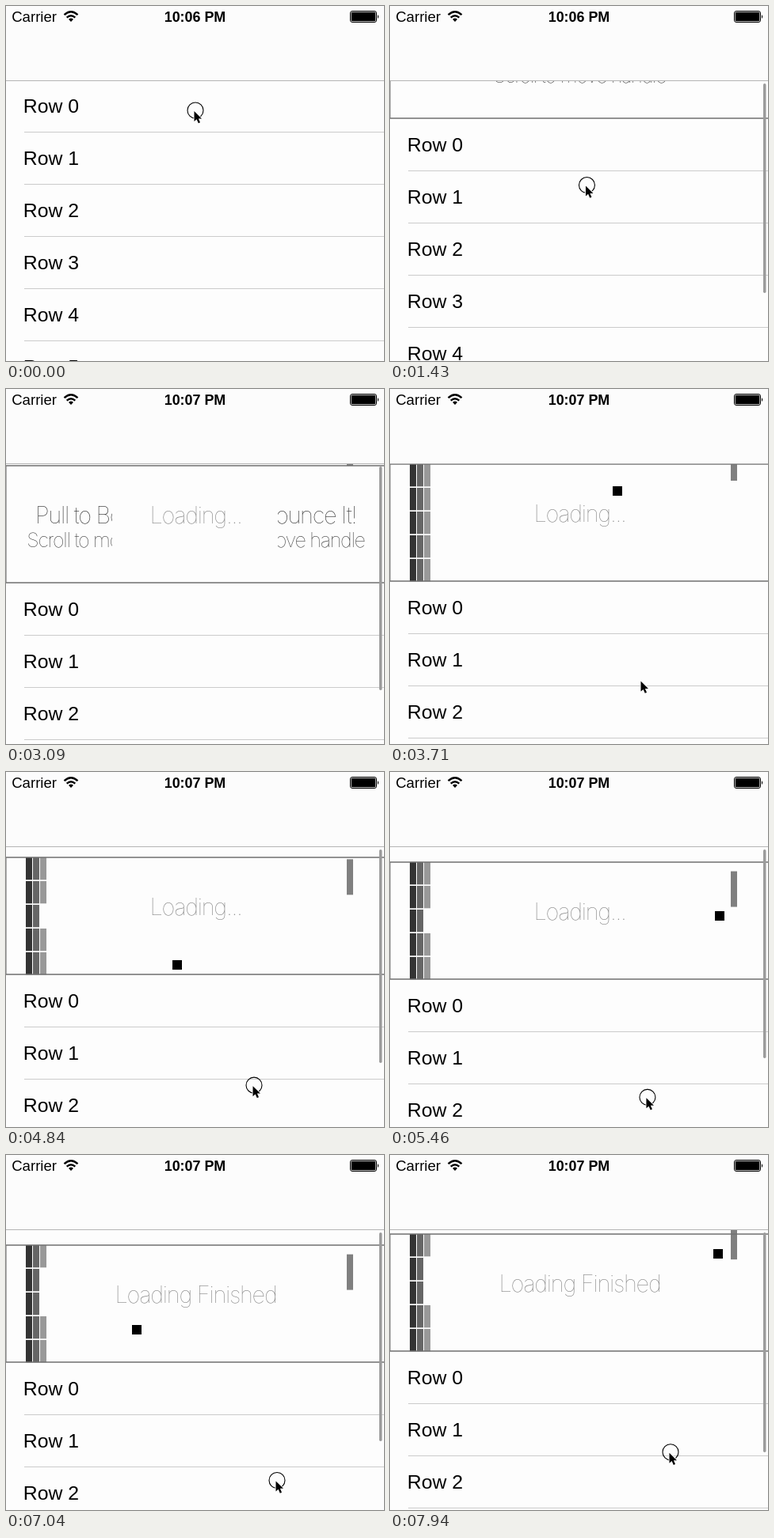
Animation, 477 px wide and 449 px high, one loop 8000 ms. Source, as an HTML page:

```html
<!DOCTYPE html>
<html lang="en">
<head>
<meta charset="utf-8">
<title>Pull to refresh game</title>
<style>
  html, body { margin: 0; width: 100%; height: 100%; overflow: hidden; background: #fdfdfd; }
  svg { display: block; width: 477px; height: 449px; }
  text { font-family: "Liberation Sans", Arial, sans-serif; }
  .row { font-size: 24.8px; }
  .thin { font-family: Inter, Roboto, sans-serif; font-weight: 100; text-anchor: middle; letter-spacing: -1.3px; }
</style>
</head>
<body>
<svg viewBox="0 0 477 449">
  <defs>
    <clipPath id="below"><rect y="95" width="477" height="354"/></clipPath>
    <clipPath id="leftHalf"><rect width="238.5" height="149"/></clipPath>
    <clipPath id="rightHalf"><rect x="238.5" width="238.5" height="149"/></clipPath>
    <g id="start">
      <rect width="477" height="149" fill="#fdfdfd"/>
      <text class="thin" x="239.5" y="73" font-size="29" fill="#333">Pull to Bounce It!</text>
      <text class="thin" x="239.5" y="103" font-size="25.2" fill="#333">Scroll to move handle</text>
    </g>
  </defs>
  <rect width="477" height="449" fill="#fdfdfd"/>
  <rect width="477" height="94" fill="#fcfcfc"/>
  <rect y="94" width="477" height="1" fill="#b4b4b4"/>
  <g clip-path="url(#below)">
    <g id="rows"></g>
    <g id="box">
      <g id="game">
        <g id="bricks"></g>
        <text id="label" class="thin" x="239.5" y="73" font-size="29" fill="#888"></text>
        <rect id="paddle" x="430" width="8" height="45" fill="#808080"/>
        <rect id="ball" width="12" height="12"/>
      </g>
      <g id="doors">
        <g id="doorL"><use href="#start" clip-path="url(#leftHalf)"/></g>
        <g id="doorR"><use href="#start" clip-path="url(#rightHalf)"/></g>
      </g>
      <path d="M.5 0V148" stroke="#aaa"/>
      <path d="M0 0H477M0 148H477" stroke="#707070" stroke-width="1.6"/>
    </g>
    <rect id="bar" x="471" y="98" width="3.5" rx="1.75" fill="#9b9b9b"/>
  </g>

  <text x="7.2" y="20" font-size="18.6">Carrier</text>
  <text id="clock" x="238.5" y="20" font-size="17.9" font-weight="bold" text-anchor="middle"></text>
  <path d="M73.5 11.2Q82 3.4 90.5 11.2M76.7 14.6Q82 9.8 87.3 14.6" fill="none" stroke="#000" stroke-width="2.4"/>
  <path d="M79 16.8Q82 14.4 85 16.8L82 20Z"/>
  <rect x="434.5" y="6.5" width="33" height="14" rx="2.5" fill="none" stroke="#000"/>
  <rect x="435.7" y="7.7" width="30.6" height="11.6" rx="1.2"/>
  <path d="M469 11Q471.4 13.5 469 16Z"/>

  <g id="cursor">
    <circle id="touch" r="10" fill="none" stroke="#000" stroke-width="1.1"/>
    <path d="M-1.5 1V14L1.6 11.3L3.8 16.2L6 15.2L3.9 10.4H8Z" stroke="#fff" stroke-width="1.6" paint-order="stroke"/>
  </g>
</svg>
<script>
const LOOP = 8000, STEP = 87.5, RELEASE = 2920, DRAG = 3750, REST = 150, PULL = 168.5;
const LAP = 367, DROP = 136;   // ball travel between its side and top/bottom limits
const NS = "http://www.w3.org/2000/svg";
const $ = id => document.getElementById(id);

function add(parent, tag, attrs, text = "") {
  const el = document.createElementNS(NS, tag);
  for (const k in attrs) el.setAttribute(k, attrs[k]);
  el.textContent = text;
  return parent.appendChild(el);
}
const move = (id, x, y) => $(id).setAttribute("transform", `translate(${x} ${y})`);
const show = (el, on) => el.setAttribute("visibility", on ? "inherit" : "hidden");
const unit = v => Math.max(0, Math.min(1, v));
const smooth = p => p * p * (3 - 2 * p);
// Runs from size down to 0 and back up as u grows.
const bounce = (u, size) => Math.abs(size - u % (2 * size));

// Steering while the game runs: [time, extra pull, finger x]
const STEER = [[DRAG, 0, 318], [4845, 13, 313], [5488, 19, 325],
  [6070, 13, 336], [7033, 19, 342], [7908, 5, 354]];

function steer(t) {
  const i = Math.max(1, STEER.findIndex(k => k[0] > t));
  const [a, b] = t >= 7908 ? STEER.slice(-2) : [STEER[i - 1], STEER[i]];
  const p = smooth(unit((t - a[0]) / (b[0] - a[0])));
  return [a[1] + (b[1] - a[1]) * p, a[2] + (b[2] - a[2]) * p];
}

for (let i = 0; i < 6; i++) {
  add($("rows"), "text", { class: "row", x: 21.8, y: 135 + 66 * i }, "Row " + i);
  add($("rows"), "rect", { x: 23, y: 159 + 66 * i, width: 454, height: 1, fill: "#cbcbcb" });
}
const bricks = ["#333", "#666", "#999"].map((fill, c) => [0, 1, 2, 3, 4].map(r =>
  add($("bricks"), "rect", { x: 25 + 9 * c, y: 30 * r, width: 8, height: 28.3, fill })));

function scrollAt(t, over) {
  if (t < RELEASE) return PULL * smooth(unit((t - 1000) / 1220));
  return REST + over + (PULL - REST) * (1 - unit((t - RELEASE) / 350)) ** 3;
}

// Sideways distance covered, slowing a little with time
function travel(t) {
  const run = Math.max(0, t - 3323);
  return run * (.3595 - 9.05e-6 * run);
}

// Height in the box; the paddle turns the ball upside down and adds speed
function ballY(s) {
  const q = s - 2 * LAP;
  const u = q < 0 ? 53 + .404 * s : 194.5 + q * (.695 - 7e-5 * q);
  return 6 + bounce(u, DROP);
}

function drawGame(t, over) {
  const s = travel(t);
  $("ball").setAttribute("x", Math.round(57 + bounce(s, LAP) - 6));
  $("ball").setAttribute("y", Math.round(ballY(s) - 6));
  $("paddle").setAttribute("y", -24 + 2.35 * over - .025 * over * over);
  bricks[2].forEach(b => show(b, true));
  for (let hit = LAP; hit <= s; hit += 2 * LAP)
    show(bricks[2][Math.floor(ballY(hit) / 30)], false);
  $("label").textContent = t < 5920 ? "Loading..." : "Loading Finished";

  const open = unit((t - RELEASE) / 400) * 239;
  show($("doors"), open < 239);
  move("doorL", -open, 0);
  move("doorR", open, 0);
}

function drawCursor(t, off, over, x) {
  if (t < RELEASE) {
    // finger travel behind a rubber-banded pull
    const drag = 846 / .55 * off / (846 - off);
    move("cursor", 239 + drag * .1, 132 + drag);
  } else {
    move("cursor", x, 363 + 2.55 * over + 50 * Math.exp((3270 - t) / 200));
  }
  show($("cursor"), t < RELEASE || t >= 3270);
  show($("touch"), t < 60 || (t >= 1060 && t < RELEASE) || t >= DRAG + 100);
}

function draw(now) {
  const t = Math.max(0, RELEASE + STEP * Math.floor((now - RELEASE + 10) / STEP));
  const playing = t >= RELEASE;
  const [over, x] = steer(t);
  const off = Math.round(scrollAt(t, over) * unit((t - 1040) / 10));

  move("rows", 0, off);
  move("box", 0, off - 55);
  show($("box"), off > 0);
  show($("game"), playing);
  $("clock").textContent = playing ? "10:07 PM" : "10:06 PM";
  drawGame(t, over);

  $("bar").setAttribute("opacity", t < 1060 ? 0 : t < DRAG + 100 ? unit((3500 - t) / 250) : 1);
  $("bar").setAttribute("height", playing ? 283 - over : 314 - off);
  drawCursor(t, off, over, x);
}

const begin = performance.now();
function frame() {
  draw((performance.now() - begin) % LOOP);
  requestAnimationFrame(frame);
}
frame();
</script>
</body>
</html>
```
